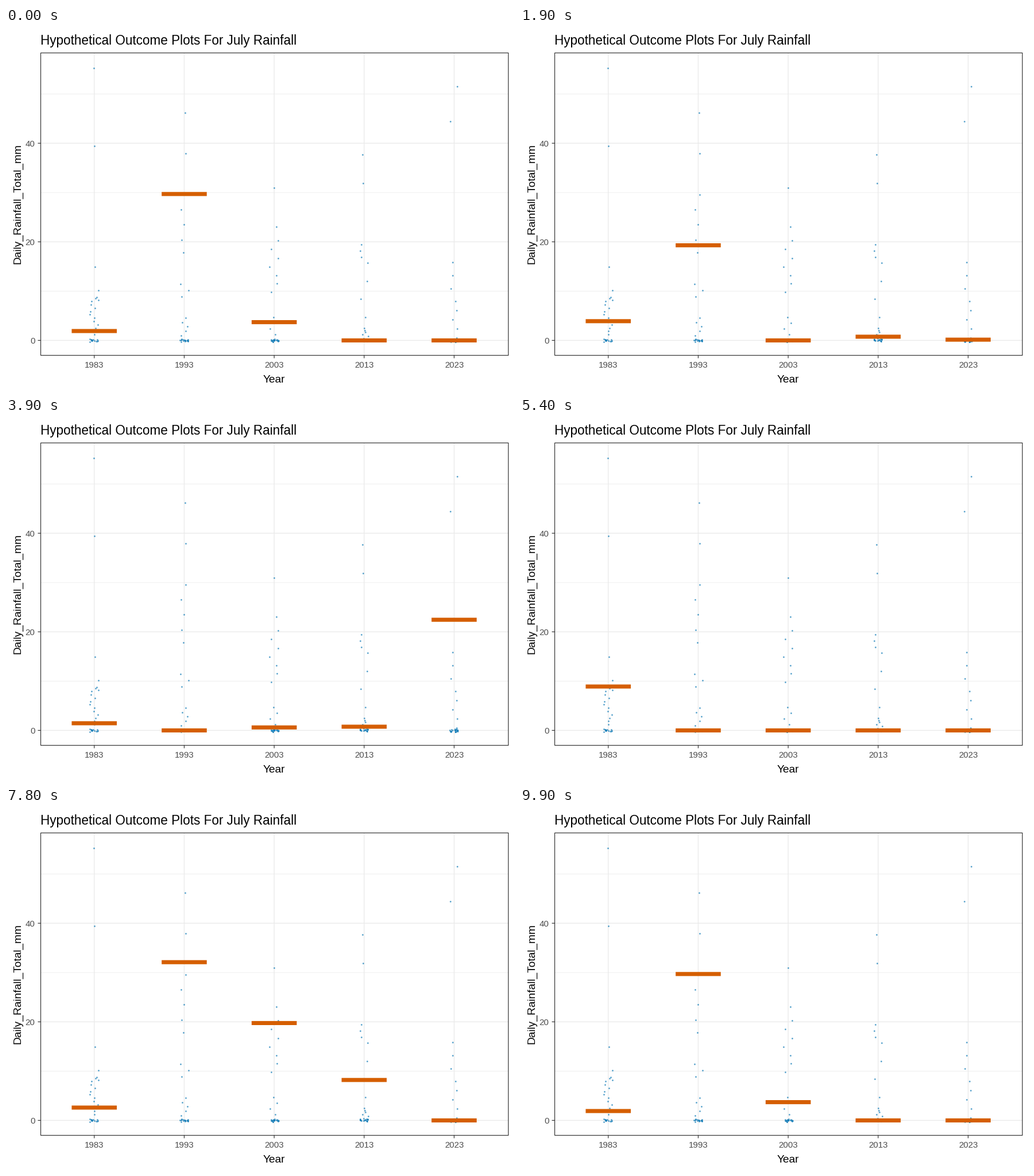
Recreate the animation shown at these times as a matplotlib script. Size 885x632 px, loop 10 s.

```python
import matplotlib.pyplot as plt
import numpy as np
from matplotlib.animation import FuncAnimation
from matplotlib.patches import Rectangle

W, H, DPI = 885, 632, 120
PX = 72 / DPI
LEFT, RIGHT, TOP, BOTTOM = 60.5, 875.2, 43.5, 571.5
STEP, BAR_W, BAR_H = 156.73, 78.6, 7.1
DAYS, DRAWS = 31, 20
BLUE, ORANGE = "#0072B2", "#D55E00"
GRID, DARK, GREY = "#EBEBEB", "#333333", "#4D4D4D"

# Rainfall of the wet days, wettest first: {rank: mm}, linear in between
WET = {
    1983: {0: 55.2, 1: 39.4, 2: 14.9, 3: 10.2, 4: 8.8, 7: 7.9, 17: 1.2},
    1993: {0: 46.2, 2: 29.6, 5: 20.4, 6: 17.8, 7: 11.4, 9: 8.9, 10: 4.6, 14: 1},
    2003: {0: 31, 1: 23.1, 2: 20.3, 5: 14.9, 8: 9.8, 9: 4.7, 12: 1.2},
    2013: {0: 37.7, 1: 31.9, 2: 19.4, 5: 15.7, 8: 4.7, 9: 2.5, 14: 0.4},
    2023: {0: 51.5, 1: 44.4, 2: 15.8, 5: 7.9, 9: 0.5},
}

# Draws that hit a wet day: {draw: mm}; every other draw is dry
HITS = {
    1983: {0: 1.9, 2: 7.8, 3: 7.8, 5: 55.5, 7: 2.9, 9: 55.5, 11: 8.9, 12: 4,
           16: 5.2},
    1993: {0: 29.7, 3: 38.6, 6: 46.4, 14: 17.5, 15: 38.6, 16: 25.6, 17: 38.6},
    2003: {0: 3.7, 6: 5, 8: 1.2, 12: 12.1, 13: 5, 15: 23.1, 16: 16.4},
    2013: {1: 19.6, 3: 1.5, 8: 1.5, 16: 16.4},
    2023: {4: 0.3, 7: 0.5, 8: 44.4, 10: 4.4, 13: 14.4, 18: 0.5},
}


def y_px(mm):
    return 545.4 - 8.605 * mm


def x_px(i):
    return 467.2 + STEP * (i - 2)


def july(year, rng):
    """Horizontal jitter and rainfall of each day."""
    ranks, mm = zip(*WET[year].items())
    wet = np.interp(np.arange(ranks[-1] + 1), ranks, mm)
    dry = rng.uniform(-0.28, 0.28, DAYS - len(wet))
    return rng.uniform(-7.8, 7.8, DAYS), np.append(wet, dry)


plt.rcParams["font.family"] = "Liberation Sans"
fig = plt.figure(figsize=(W / DPI, H / DPI), dpi=DPI, facecolor="white")
ax = fig.add_axes([0, 0, 1, 1])
ax.set_xlim(0, W)
ax.set_ylim(H, 0)
ax.axis("off")


def line(xs, ys, color, width, z):
    ax.plot(xs, ys, color=color, lw=width * PX, zorder=z,
            solid_capstyle="butt", snap=False)


def label(x, y, text, size, color="black", ha="center", **kw):
    ax.text(x, y, text, fontsize=size, color=color, ha=ha, va="baseline", **kw)


for mm in range(0, 51, 10):
    y, major = y_px(mm), mm % 20 == 0
    line([LEFT, RIGHT], [y, y], GRID, 1.4 if major else 0.8, 1)
    if major:
        line([LEFT - 5, LEFT], [y, y], DARK, 1.2, 4)
        label(50.5, y + 5.6, str(mm), 9, GREY, "right")

rng = np.random.default_rng(7)
bars = []
for i, year in enumerate(WET):
    x = x_px(i)
    line([x, x], [TOP, BOTTOM], GRID, 1.4, 1)
    line([x, x], [BOTTOM, BOTTOM + 5], DARK, 1.2, 4)
    label(x, 593, str(year), 9, GREY)

    dx, mm = july(year, rng)
    ax.scatter(x + dx, y_px(mm), s=(2.8 * PX) ** 2, color=BLUE, alpha=0.65,
               linewidths=0, zorder=2)

    bar = Rectangle((x - BAR_W / 2, 0), BAR_W, BAR_H, fc=ORANGE, lw=0,
                    zorder=3, snap=False)
    bars.append(ax.add_patch(bar))

ax.add_patch(Rectangle((LEFT, TOP), RIGHT - LEFT, BOTTOM - TOP, fill=False,
                       ec=DARK, lw=1.2 * PX, zorder=5, snap=False))
label(60, 28.5, "Hypothetical Outcome Plots For July Rainfall", 13.5, ha="left")
label(467.2, 619, "Year", 11.5)
label(25, 307.5, "Daily_Rainfall_Total_mm", 11.5, rotation=90,
      rotation_mode="anchor")


def update(frame):
    # Four steps of rest, one halfway step; the second half runs a step early.
    k, step = divmod(frame + (frame >= 50), 5)
    for bar, hits in zip(bars, HITS.values()):
        now, after = (hits.get(n % DRAWS, 0) for n in (k, k + 1))
        mm = (now + after) / 2 if step == 4 else now
        bar.set_y(y_px(mm) - BAR_H / 2)
    return bars


anim = FuncAnimation(fig, update, frames=100, interval=100, repeat=True,
                     repeat_delay=0, blit=False)
plt.show()
```
